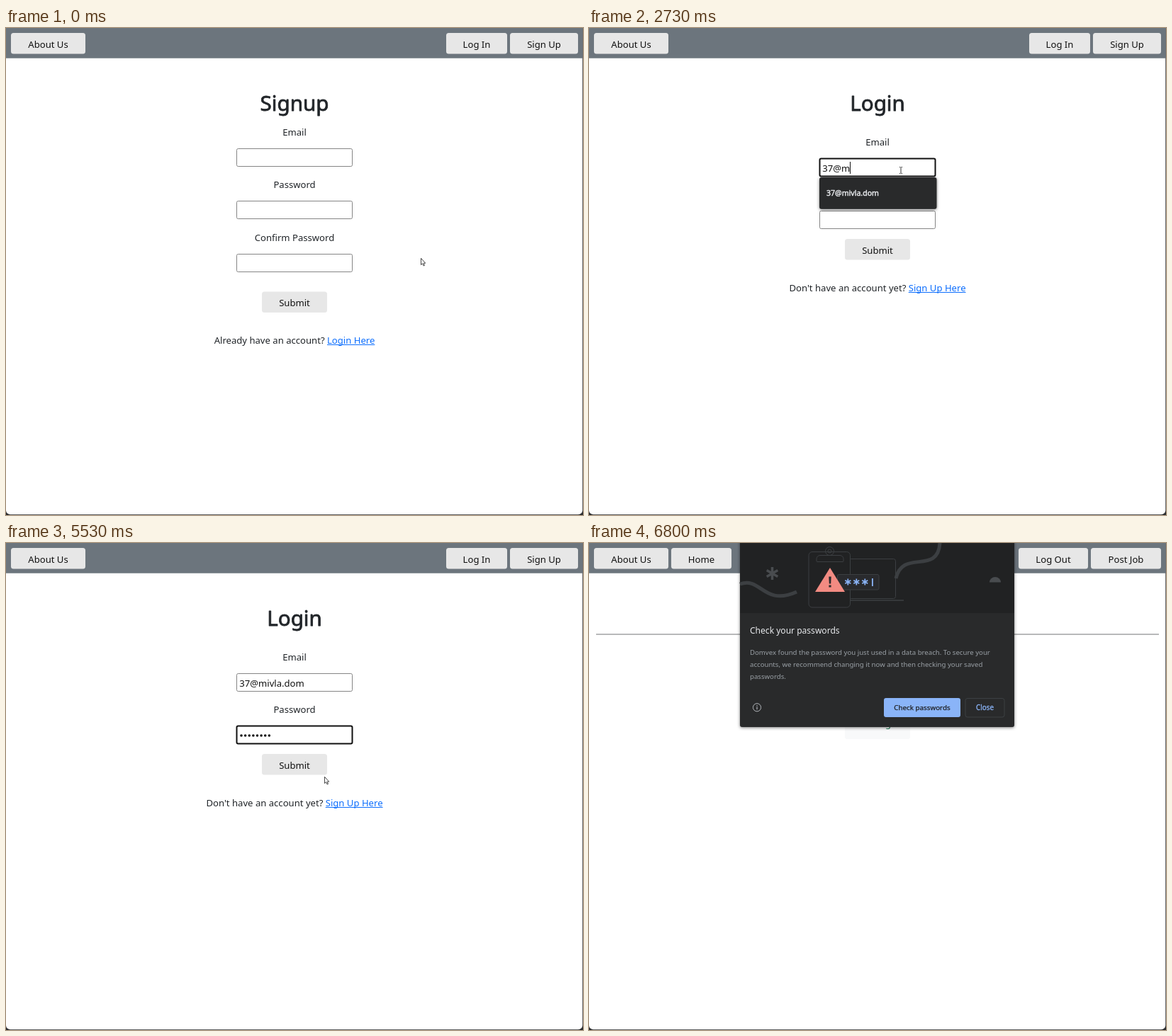
An HTML page with a canvas for the animation above (6.94 s loop, 814x688 px).

```html
<!DOCTYPE html>
<html lang="en">
<head>
<meta charset="utf-8">
<title>Login flow</title>
<style>
  html, body { margin: 0; width: 100%; height: 100%; overflow: hidden; background: #fff; }
  canvas { display: block; }
</style>
</head>
<body>
<canvas id="stage" width="814" height="688"></canvas>
<script>
const W = 814, H = 688, LOOP = 6940, MID = 407;
const stage = document.getElementById('stage').getContext('2d');
const dialogLayer = document.createElement('canvas');
dialogLayer.width = W;
dialogLayer.height = 275;
let g = stage;

const EMAIL = '37@mivla.dom';
const EMAIL_TIMES = [1670, 2130, 2270, 2600, 2870, 3000, 3070, 3200, 3400, 3470, 3530, 3670];
const DOT_TIMES = [3930, 4070, 4200, 4400, 4530, 4670, 4730, 4870];
const SUGGESTIONS = ['31@mivla.dom', EMAIL, '58@mivla.dom', 'brunelda.ostrik@mivla.dom',
  'tavi@mivla.dom', 'ostrik2@mivla.dom'];

// time, x, y of the pointer
const POINTER = [
  [0, 585, 325], [200, 602, 354], [330, 690, 240], [470, 718, 120], [600, 690, 40], [730, 665, 17],
  [800, 662, 20], [930, 625, 58], [1130, 538, 130], [1330, 455, 186], [1470, 440, 201],
  [5000, 440, 201], [5130, 446, 256], [5270, 464, 286], [5400, 464, 318], [5530, 449, 330],
  [5800, 429, 320], [5930, 424, 313], [6000, 422, 316], [6130, 335, 475], [6270, 236, 630], [6400, 188, 700]
];

const typed = (times, t) => times.filter(s => t >= s).length;

function box(x, y, w, h, r, fill, stroke, width = 1) {
  g.beginPath();
  g.roundRect(x, y, w, h, r);
  if (fill) { g.fillStyle = fill; g.fill(); }
  if (stroke) { g.strokeStyle = stroke; g.lineWidth = width; g.stroke(); }
}

function line(color, width, path) {
  g.strokeStyle = color;
  g.lineWidth = width;
  g.stroke(new Path2D(path));
}

function fillPath(color, path) {
  g.fillStyle = color;
  g.fill(new Path2D(path));
}

// weight adds a thin outline for medium and semibold text
function text(str, x, y, size = 13.1, color = '#212529', align = 'center', weight = 0) {
  g.font = `${size}px "Noto Sans", sans-serif`;
  g.textAlign = align;
  g.fillStyle = color;
  g.fillText(str, x, y);
  if (weight) {
    g.strokeStyle = color;
    g.lineWidth = weight;
    g.lineJoin = 'round';
    g.strokeText(str, x, y);
  }
  return g.measureText(str).width;
}

function button(label, x, y, w) {
  box(x, y, w, 29.5, 3.5, '#e7e7e7');
  text(label, x + w / 2, y + 20.7, 13.1, '#111');
}

function field(y, focused) {
  if (focused) box(325.5, y + .5, 163, 25, 2, '#fff', '#101010', 2);
  else box(325.5, y + .5, 163, 25, 2, '#fff', '#858585');
}

function prompt(question, link, y) {
  g.font = '13.1px "Noto Sans", sans-serif';
  const lead = question + ' ';
  const x = MID - g.measureText(lead + link).width / 2;
  const linkX = x + text(lead, x, y, 13.1, '#212529', 'left');
  const w = text(link, linkX, y, 13.1, '#0d6efd', 'left');
  g.fillRect(linkX, Math.round(y + 1.5), w, 1);
}

function frame(leftButtons, rightButtons) {
  g.fillStyle = '#2a2c2e';
  g.fillRect(0, 0, W, H);
  box(0, 0, 813.3, 687.3, [0, 0, 6, 6], '#fff');
  g.fillStyle = '#6c757d';
  g.fillRect(0, 0, 813.3, 42.7);
  for (const [label, x, w] of [...leftButtons, ...rightButtons]) button(label, x, 7, w);
}

const ABOUT = ['About Us', 7, 105];
const GUEST = [['Log In', 621, 86], ['Sign Up', 711, 96]];
const MEMBER = [['Log Out', 606, 98], ['Post Job', 708, 99]];

function heading(str, y, size = 29.6, weight = .8) {
  text(str, MID, y, size, '#212529', 'center', weight);
}

function signupPage() {
  frame([ABOUT], GUEST);
  heading('Signup', 116.5);
  ['Email', 'Password', 'Confirm Password'].forEach((label, i) => {
    text(label, MID, 152 + i * 74.3);
    field(170 + Math.round(i * 74.3), false);
  });
  button('Submit', 361, 372.5, 92);
  prompt('Already have an account?', 'Login Here', 445.5);
}

function loginPage(t) {
  const inEmail = t >= 1530 && t < 3870;
  const inPassword = t >= 3870 && t < 5930;
  frame([ABOUT], GUEST);
  heading('Login', 116.5);
  text('Email', MID, 166);
  field(184, inEmail);
  text('Password', MID, 240);
  field(258, inPassword);
  button('Submit', 361, 298, 92);
  prompt("Don't have an account yet?", 'Sign Up Here', 371.5);

  const width = text(EMAIL.slice(0, typed(EMAIL_TIMES, t)), 329.3, 203, 13.1, '#111', 'left');
  const dots = typed(DOT_TIMES, t);
  g.fillStyle = '#111';
  for (let i = 0; i < dots; i++) {
    g.beginPath();
    g.arc(332 + i * 5.62, 272, 1.8, 0, 7);
    g.fill();
  }
  if (inEmail) g.fillRect(Math.round(329 + width), 189, 1, 17);
  if (inPassword && t < 5070) g.fillRect(Math.round(329.5 + dots * 5.62), 263, 1, 17);
  suggestions(t);
}

function suggestions(t) {
  let items = [];
  if (t >= 1530 && t < 1670) items = SUGGESTIONS;
  else if (t >= 1930 && t < 2130) items = SUGGESTIONS.slice(0, 2);
  else if (t >= 2400 && t < 3730) items = [EMAIL];
  if (!items.length) return;
  const w = items.length > 2 ? 187.5 : 165.5;
  shadowed(() => box(325, 211, w, 13.5 + items.length * 31.2, 3, '#292a2b'));
  items.forEach((item, i) => text(item, 335, 237.3 + i * 31.1, 10.6, '#e8eaed', 'left', .45));
}

function shadowed(draw) {
  g.save();
  g.shadowColor = 'rgba(0,0,0,.5)';
  g.shadowBlur = 4;
  g.shadowOffsetY = 1;
  draw();
  g.restore();
}

function homePage() {
  frame([ABOUT, ['Home', 116, 85]], MEMBER);
  heading('Home', 78.5);
  heading('Welcome!', 117, 25, .7);
  heading('Please select an option', 155.5, 21.3, .5);
  g.fillStyle = '#737577';
  g.fillRect(10, 128.5, 794, 1);
  box(361, 181, 92, 42, 3, '#f8f9fa');
  text('Seeking', MID, 206, 13.1, '#0d3fc0');
  box(361, 235, 92, 42, 3, '#f8f9fa');
  text('Hiring', MID, 259.5, 13.1, '#14734a');
}

function asterisk(x, y, r, width, color) {
  g.strokeStyle = color;
  g.lineWidth = width;
  g.beginPath();
  for (let i = 0; i < 3; i++) {
    const a = Math.PI / 2 + i * Math.PI / 3, dx = r * Math.cos(a), dy = r * Math.sin(a);
    g.moveTo(x - dx, y - dy);
    g.lineTo(x + dx, y + dy);
  }
  g.stroke();
}

function ring(x, y, r, color) {
  g.strokeStyle = color;
  g.lineWidth = 1;
  g.beginPath();
  g.arc(x, y, r, 0, 7);
  g.stroke();
}

function illustration() {
  const grey = '#3c3f42';
  line(grey, 5, 'M213 58C243 47 246 90 293 69');
  line(grey, 5, 'M433 50C442 8 492 46 495 0');
  asterisk(258.5, 43, 9, 3.5, '#494c4f');
  fillPath('#494c4f', 'M565 55.5A8 7.5 0 0 1 581 55.5Z');
  box(366.5, 22.5, 66, 56, 3, null, grey);
  line(grey, 1.5, 'M366 81H444');
  box(310, 12.5, 58.5, 78.5, 5, '#212223', grey);
  box(321, 17.5, 38, 9, [5, 5, 1, 1], null, grey);
  ring(339.5, 11.5, 6, grey);
  ring(339.5, 11.5, 2.5, grey);
  box(350.5, 44.5, 58.5, 21.5, 2, '#292a2d', grey);
  for (const x of [365.3, 377.3, 389.3]) asterisk(x, 55, 4.6, 1.8, '#8ab4f8');
  g.fillStyle = '#8ab4f8';
  g.fillRect(399, 50, 1.8, 11);
  fillPath('#f28b82', 'M340 35L361 69H319Z');
  fillPath('#292a2b', 'M338.3 47.5H341.7L341.2 57.5H338.8ZM338.4 59.5H341.6V62.5H338.4Z');
}

function dialog(focusRing) {
  g.clearRect(0, 0, W, 275);
  shadowed(() => box(213, -6, 387, 266, 3, '#292a2b'));
  g.fillStyle = '#212223';
  g.fillRect(213, 0, 387, 99);
  illustration();
  text('Check your passwords', 227, 128.3, 12.05, '#e8eaed', 'left');
  ['Domvex found the password you just used in a data breach. To secure your',
   'accounts, we recommend changing it now and then checking your saved',
   'passwords.'].forEach((row, i) => text(row, 227, 158 + i * 17.2, 9.65, '#9aa0a6', 'left'));
  ring(237, 232.3, 5.6, '#b0b4b9');
  g.fillStyle = '#b0b4b9';
  g.fillRect(236.4, 231.5, 1.2, 3.8);
  g.fillRect(236.4, 229.2, 1.2, 1.3);
  box(416, 219, 108, 27, 3, '#8ab4f8');
  if (focusRing) {
    box(415.5, 218.5, 109, 28, 4, null, '#a9c8fb', 2);
    box(417.5, 220.5, 105, 24, 2, null, '#5f7ca8');
  }
  text('Check passwords', 470, 236, 9.8, '#202124', 'center', .25);
  box(531, 219.5, 55, 26.5, 3, null, '#3c4043');
  text('Close', 558.5, 236, 9.9, '#8ab4f8', 'center', .3);
}

// The dialog fades in while tilting flat
function showDialog(t) {
  const p = Math.min(1, (t - 6150) / 250);
  if (p <= 0) return;
  g = dialogLayer.getContext('2d');
  dialog(t < 6800);
  g = stage;
  if (p === 1) return g.drawImage(dialogLayer, 0, 0);
  const tilt = 3.7 * (1 - p) ** 2;
  const shift = y => tilt * (-6 + 4 * ((y - 60) / 200) ** 2);
  g.globalAlpha = 1 - (1 - p) ** 3;
  for (let row = 0; row < 290; row++) {
    const y = row - shift(row - shift(row));
    if (y < 0 || y > 273) continue;
    const scale = 1 + tilt * .0155 * y / 260;
    g.drawImage(dialogLayer, 0, y, W, 1, 406.5 * (1 - scale), row, W * scale, 1);
  }
  g.globalAlpha = 1;
}

function pointer(t) {
  const next = POINTER.findIndex(k => k[0] > t);
  if (next < 0) return;
  const [t0, x0, y0] = POINTER[next - 1], [t1, x1, y1] = POINTER[next];
  const f = (t - t0) / (t1 - t0);
  g.save();
  g.translate(x0 + (x1 - x0) * f, y0 + (y1 - y0) * f);
  const beam = t >= 1400 && t < 5270;
  const hand = t >= 670 && t < 870 || t >= 5730 && t < 6000;
  if (beam) {
    line('#333', 1, 'M-2 -4.5H-.6M.6 -4.5H2M0 -4V4M-2 4.5H-.6M.6 4.5H2');
  } else {
    const shape = hand
      ? 'M-1 0.5Q0 -.8 1 .5V4.5L5 5.3Q6.3 5.8 6 7.5L5 12H-1.2L-4 7.5Q-3.6 6 -1 8Z'
      : 'M.5 .3V9.6L2.6 7.7L4.1 11L5.5 10.4L4.1 7.2H6.7Z';
    fillPath('#fff', shape);
    line('#333', .9, shape);
  }
  g.restore();
}

function draw(t) {
  if (t < 800) signupPage();
  else if (t < 6000) loginPage(t);
  else homePage();
  pointer(t);
  if (t >= 6000) showDialog(t);
}

// Motion advances 15 steps a second, rounded to 10 ms
function tick() {
  const t = performance.now() % LOOP;
  const step = Math.floor((t + 4) * 15 / 1000);
  draw(Math.round(step * 100 / 15) * 10);
  requestAnimationFrame(tick);
}
tick();
</script>
</body>
</html>
```
